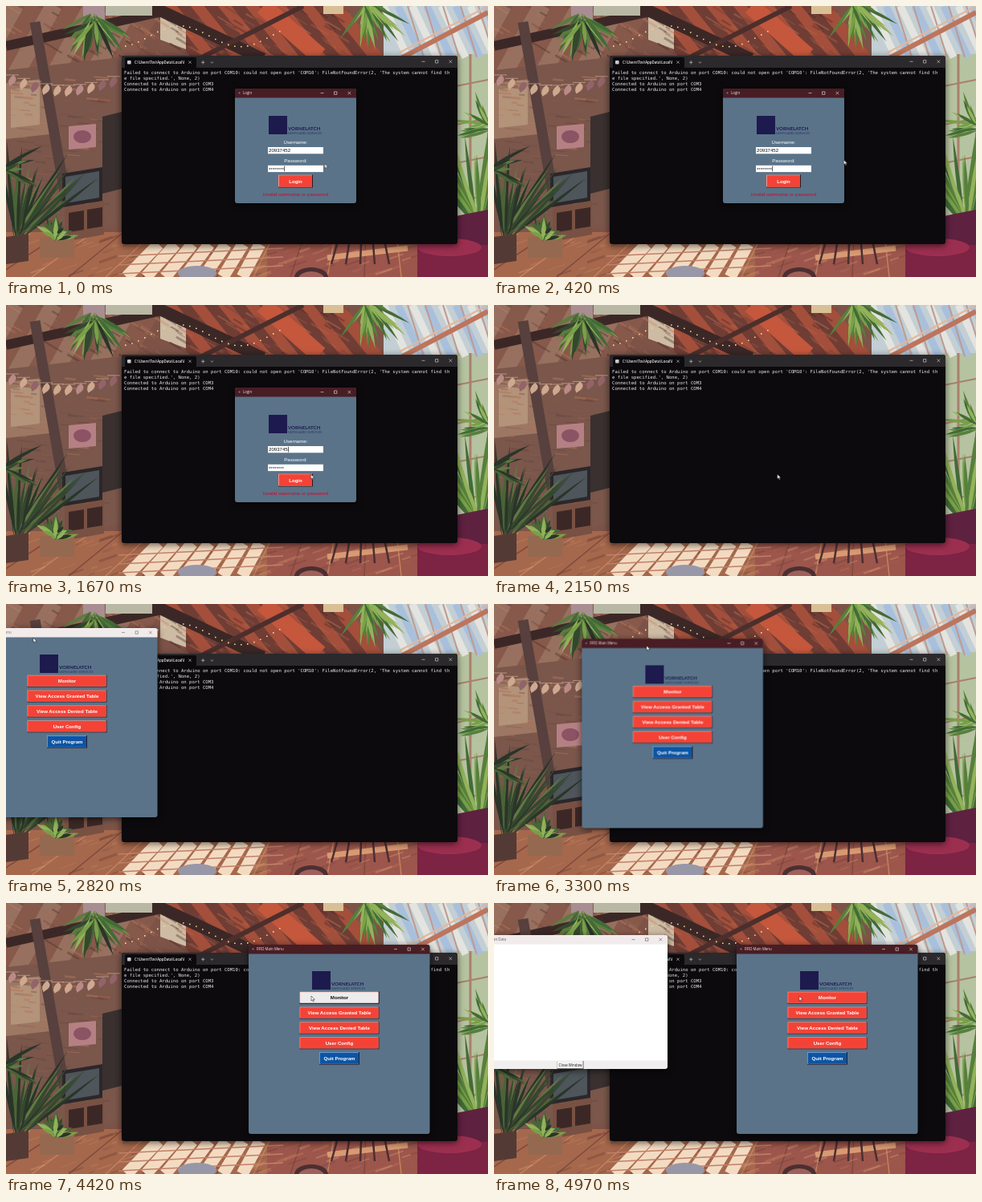
Recreate the animation shown at these times as an HTML page with a canvas. Size 600 by 338 pixels, loop 5 s.

```html
<!DOCTYPE html>
<html lang="en">
<head>
<meta charset="utf-8">
<title>Login demo</title>
<style>
html, body { margin: 0; width: 100%; height: 100%; overflow: hidden; background: #7d5348; }
canvas, svg { position: absolute; left: 0; top: 0; width: 600px; height: 338px; }
text { font: 6.1px "Liberation Sans", Arial, sans-serif; }
.mono { font: 5.62px "DejaVu Sans Mono", monospace; fill: #ececec; }
.ui { font: 4.4px "Open Sans", sans-serif; }
.tab { font-weight: 600; fill: #f2f2f2; }
.bold { font-weight: 700; }
.brand { font: 700 6.1px Lato, sans-serif; fill: #1d1a4e; }
.tag { font: 3.5px Lato, sans-serif; fill: #26315c; letter-spacing: .3px; }
.mid { text-anchor: middle; }
.win { filter: drop-shadow(0 2px 4px #0009); }
.icons { fill: none; stroke-width: .6; }
</style>
</head>
<body>
<canvas id="room" width="600" height="338"></canvas>
<svg id="stage" viewBox="0 0 600 338"></svg>
<script>
// Painted room
const g = document.getElementById('room').getContext('2d');
let seed = 11;
const rnd = (a, b) => {
  seed = (seed * 16807) % 2147483647;
  return a + (b - a) * seed / 2147483647;
};
const pick = list => list[Math.floor(rnd(0, list.length))];
const repeat = (n, draw) => { for (let i = 0; i < n; i++) draw(i); };

function beam(color, w, x1, y1, x2, y2) {
  g.strokeStyle = color;
  g.lineWidth = w;
  g.beginPath();
  g.moveTo(x1, y1);
  g.lineTo(x2, y2);
  g.stroke();
}
function block(color, x, y, w, h, skew = 0) {
  g.fillStyle = color;
  g.beginPath();
  g.moveTo(x, y);
  g.lineTo(x + w, y + skew);
  g.lineTo(x + w, y + h + skew);
  g.lineTo(x, y + h);
  g.fill();
}
function oval(color, x, y, rx, ry) {
  g.fillStyle = color;
  g.beginPath();
  g.ellipse(x, y, rx, ry, 0, 0, 7);
  g.fill();
}
function leaf(x, y, angle, len, w, color) {
  g.save();
  g.translate(x, y);
  g.rotate(angle);
  g.fillStyle = color;
  g.beginPath();
  g.quadraticCurveTo(len * .45, -w, len, w / 2);
  g.moveTo(0, 0);
  g.quadraticCurveTo(len * .45, -w, len, w / 2);
  g.quadraticCurveTo(len * .45, w, 0, 0);
  g.fill();
  g.restore();
}
const fan = (x, y, n, aim, spread, len, w, colors) => repeat(n, () =>
  leaf(x + rnd(-5, 5), y + rnd(-5, 5), aim + rnd(-spread, spread), rnd(len * .4, len), w, pick(colors)));

function brush(n, x, y, w, h, slope, colors) {
  g.globalAlpha = .35;
  repeat(n, () => {
    const a = rnd(x, x + w), b = rnd(y, y + h), l = rnd(6, 24);
    beam(pick(colors), rnd(.6, 3), a, b, a + l, b + l * slope);
  });
  g.globalAlpha = 1;
}

const fresh = ['#56803c', '#79a048', '#426b38', '#93b25a'];
const shade = ['#35482f', '#4b6437', '#2a3529', '#5f7a42'];
const warm = ['#c98462', '#6b3d36', '#b8664a', '#8d5a4c'];
const dark = '#3b2826';

function paintCeiling() {
  repeat(9, i => beam(i % 2 ? '#97705f' : '#86594b', 26, i * 24 - 10, 0, i * 24 - 60, 90));
  repeat(14, i => beam(i % 2 ? '#a34f3b' : '#703d35', 16, 185 + i * 17, -5, 245 + i * 17, 70));
  block('#cdbba4', 192, 12, 32, 30, 12);
  brush(130, 0, 0, 430, 62, .6, [...warm, dark]);
  beam(dark, 12, 0, 50, 190, 8);
  beam(dark, 15, 180, 0, 320, 66);
  beam('#c4573c', 22, 320, 0, 390, 62);
  beam('#4c2f2c', 6, 240, 66, 370, 0);
  block('#b8b8a4', 124, 0, 58, 12);
  block('#d9bf95', 395, 0, 25, 10);
  repeat(26, i => block('#f3d894', 140 + i * 8, 50 - 26 * Math.sin(i / 6) ** 2, 1.6, 1.6));
}

function paintWall() {
  block('#7a564b', 0, 80, 144, 210, -16);
  block('#9c7763', 0, 96, 54, 70, -6);
  block('#b3937a', 6, 104, 36, 48, -4);
  brush(110, 0, 80, 125, 190, .1, [...warm, '#5b4340']);
  beam('#57403d', 13, 36, 20, 76, 250);
  block('#39302f', 120, 138, 24, 96, -6);
  block('#b58084', 78, 150, 34, 29, -3);
  oval('#8b5363', 95, 163, 11, 8);
  repeat(10, i => {
    const x = 4 + i * 14, y = 86 + 13 * Math.sin(i / 3);
    leaf(x + 5, y, Math.PI / 2, 14, 9, pick(['#b98a86', '#cfa890', '#93636a']));
    beam('#d1b097', .7, x - 4, y, x + 12, y);
  });
}

function paintWindows() {
  block('#c3cfd4', 470, 0, 130, 64);
  block('#b6c3a0', 556, 60, 44, 225);
  repeat(9, i => beam(i % 2 ? '#a9c0dc' : '#e3e4df', 9, 470 + i * 18, 0, 500 + i * 18, 64));
  repeat(6, i => beam('#c09a90', 2, 500 + i * 22, 0, 520 + i * 22, 64));
  beam('#bd755c', 6, 490, 66, 600, 8);
  beam('#e2b79d', 2, 490, 58, 600, 0);
  repeat(4, i => beam('#a9806c', 2, 560, 100 + i * 48, 600, 92 + i * 48));
  beam('#a9806c', 3, 578, 60, 578, 270);
  fan(450, -4, 34, 1.3, .9, 62, 4, fresh);
  fan(590, 275, 26, -1.8, .5, 185, 5, fresh);
  fan(600, 150, 14, -2.8, .9, 50, 4, fresh);
}

function paintFloor() {
  block('#a5684c', 0, 282, 600, 60);
  block('#9c564c', 325, 296, 190, 42);
  repeat(16, i => beam(i % 2 ? '#80493f' : '#c4835e', 1.5, i * 46 - 60, 338, i * 38 + 30, 284));
  brush(150, 0, 290, 520, 48, -.35, [...warm, '#dda078']);
  repeat(7, i => beam('#f3dbc2', 15, 150 + i * 24, 338, 190 + i * 21, 297));
  repeat(3, i => beam('#c08068', 1.3, 140, 312 + i * 11, 345, 302 + i * 11));
  beam('#d89a72', 7, 400, 314, 500, 302);
  repeat(5, i => beam('#4b2f32', 2.5, 412 + i * 15, 297, 405 + i * 18, 322));
  oval('#4b2f32', 380, 338, 21, 12);
  oval('#a0605a', 380, 340, 16, 9);
  oval('#9797a8', 238, 333, 24, 9);
}

function paintFurniture() {
  block('#785143', 73, 252, 49, 42, -9);
  repeat(2, i => block(dark, 78 + i * 23, 258 - i * 4, 19, 24, -3));
  block('#2b272a', 70, 209, 50, 42, -8);
  block('#4e555b', 74, 213, 42, 33, -7);
  fan(14, 290, 30, -1.3, .7, 128, 4, shade);
  fan(-4, 205, 12, -.3, .9, 55, 4, shade);
  block('#543a35', 0, 288, 28, 34, -4);
  block('#94694f', 42, 288, 43, 26);
  fan(62, 288, 28, -1.6, 1.5, 26, 5, [...fresh, ...shade]);
  block('#5f2140', 560, 262, 40, 76, -8);
  block('#7d2344', 512, 298, 88, 40);
  oval('#9c2f50', 552, 301, 40, 11);
  block('#a88d92', 96, 0, 27, 18);
  fan(108, 14, 34, 1.6, 1.2, 62, 5, [...fresh, ...shade]);
}
[paintCeiling, paintWall, paintWindows, paintFloor, paintFurniture].forEach(paint => paint());

// Windows
const rect = (x, y, w, h, color, more = '') => `<rect x="${x}" y="${y}" width="${w}" height="${h}" fill="${color}" ${more}/>`;
const text = (x, y, s, cls = '', color = '', more = '') =>
  `<text x="${x}" y="${y}" class="${cls}" ${color && `fill="${color}"`} ${more}>${s}</text>`;
const group = (id, body, cls = '') => `<g id="${id}" class="${cls}">${body}</g>`;
const at = (x, y, body) => `<g transform="translate(${x} ${y})">${body}</g>`;
const controls = (right, y, ink) => `<path class="icons" stroke="${ink}" d="M${right - 44.5} ${y}h4
  M${right - 27.5} ${y - 1.7}h3.4v3.4h-3.4z M${right - 10.4} ${y - 1.8}l3.6 3.6m0-3.6l-3.6 3.6"/>`;
const bar = (w, h, color) => `<path d="M0 ${h}V3Q0 0 3 0H${w - 3}Q${w} 0 ${w} 3V${h}Z" fill="${color}"/>`;
const caption = (w, title, back, ink) => bar(w, 11.5, back) +
  '<circle cx="5.5" cy="5.5" r="1.1" fill="#5a86b8"/>' + text(10, 7.3, title, 'ui', ink) + controls(w, 5.6, ink);
const button = (x, y, w, h, label, color, ink = '#fff', lit = '#ffb3a8') =>
  rect(x, y, w, h, '#2a1c26') + rect(x, y, w - 1, h - 1, lit) + rect(x + .7, y + .7, w - 1.7, h - 1.7, color) +
  text(x + w / 2, y + h / 2 + 2, label, 'bold mid', ink);
const brand = (x, y) => rect(x, y, 23, 23, '#1d1a4e') +
  text(x + 24, y + 18, 'VORNELATCH', 'brand') + text(x + 24, y + 23, 'SAFEGUARD SERVICES', 'tag');
const entry = (y, label) => text(75.5, y - 4.2, label, 'mid', '#fff') + rect(41, y, 69, 8.3, '#fff');
const caret = (id, x, y) => rect(x, y, .7, 6.6, '#111', `id="${id}"`);

const RED = '#f44336', SLATE = '#5a7389', WINE = '#481d24', PALE = '#f2ebeb', PRESSED = '#ececec', INK = '#111';

const log = [
  "Failed to connect to Arduino on port COM10: could not open port 'COM10': FileNotFoundError(2, 'The system cannot find th",
  "e file specified.', None, 2)",
  'Connected to Arduino on port COM3',
  'Connected to Arduino on port COM4'
];
const terminal = at(144, 62, rect(0, 0, 418, 235, '#0c0a0d', 'rx="3"') + bar(418, 15, '#2b292c') +
  rect(4, 2, 89, 13.5, '#0c0a0d', 'rx="2"') + rect(7, 6, 4.6, 4.6, '#c9c9cc', 'rx=".8"') +
  text(16, 9.9, 'C:\\Users\\Tov\\AppData\\Local\\I', 'ui tab') +
  '<path class="icons" stroke="#ddd" d="M83.4 6.6l3.2 3.2m0-3.2l-3.2 3.2M99 8.3h4.4m-2.2-2.2v4.4M110.8 7.6l1.6 1.5 1.6-1.5"/>' +
  controls(418, 7.3, '#ddd') +
  log.map((s, i) => text(3, 23.1 + i * 7, s, 'mono')).join(''));

const login = at(285, 103,
  rect(0, 0, 151, 143, SLATE, 'rx="3"') + caption(151, 'Login', WINE, '#f4e8e8') + brand(42, 34) +
  entry(73, 'Username:') + text(42, 79.3, '20937452', '', INK, 'id="full"') + text(42, 79.3, '2093745', '', INK, 'id="cut"') +
  entry(95.8, 'Password:') + text(42, 103, '********', '', INK) +
  caret('passCaret', 61, 96.6) + caret('cutCaret', 66, 73.9) + caret('fullCaret', 69.4, 73.9) +
  button(54, 107.5, 43, 16, 'Login', RED) + group('loginDown', button(54, 107.5, 43, 16, 'Login', PRESSED, INK)) +
  text(75.5, 134, 'Invalid username or password', 'mid', '#d3062a'));

const menu = rect(0, 0, 225.5, 236, SLATE, 'rx="3"') +
  group('idle', caption(225.5, 'RFID Main Menu', PALE, '#6f6868')) +
  group('active', caption(225.5, 'RFID Main Menu', WINE, '#f4e8e8')) + brand(79, 33) +
  ['Monitor', 'View Access Granted Table', 'View Access Denied Table', 'User Config']
    .map((s, i) => button(63.5, 58.6 + i * 18.9, 99, 15, s, RED)).join('') +
  group('monitorDown', button(63.5, 58.6, 99, 15, 'Monitor', PRESSED, INK)) +
  button(88, 134, 50, 15.6, 'Quit Program', '#0d55a4', '#fff', '#86b2e0');

const scan = at(-26, 40,
  rect(0, 0, 242, 167, '#f0eeee', 'rx="3"') + caption(242, 'RFID Scan Data', PALE, '#5f5858') +
  rect(0, 11.5, 242, 145, '#fff') + rect(104.5, 157, 33, 10, '#555') + rect(104.5, 157, 32.2, 9.2, '#f3f1f1') +
  text(121, 163.6, 'Close Window', 'ui mid', INK));

document.getElementById('stage').innerHTML =
  group('terminal', terminal, 'win') + group('login', login, 'win') + group('menu', menu, 'win') +
  group('scan', scan, 'win') +
  group('pointer', '<path d="M0 0V6L1.4 4.8 2.4 7 3.4 6.5 2.4 4.4H4.3Z" fill="#fff" stroke="#111" stroke-width=".5"/>');

// Motion, times in ms
const LOOP = 5000;
const play = (id, frames) =>
  document.getElementById(id).animate(frames, { duration: LOOP, iterations: Infinity });

// Visible at first or not, then toggled at each given time
function toggle(id, on, ...times) {
  const frames = [0, ...times, LOOP].map((t, i) => ({
    offset: t / LOOP,
    opacity: Number(on === (i % 2 === 0)),
    easing: 'step-end'
  }));
  play(id, frames);
}
const move = (id, stops) => play(id, stops.map(([t, x, y]) =>
  ({ offset: t / LOOP, transform: `translate(${x}px, ${y}px)`, easing: 'ease-in-out' })));

const CLICK = 2050, OPEN = 2300, GRAB = 2950, PRESS = 4380;
const drag = [[GRAB, -37, 30], [3670, 269, 58], [3950, 302, 52]];
const held = drag.map(([t, x, y]) => [t, x + 80.5, y + 8.5]);

move('menu', [[0, -37, 30], ...drag, [LOOP, 302, 52]]);
move('pointer', [
  [0, 396.5, 196.5], [880, 480.5, 186.5], [1250, 384, 179], [1670, 379.5, 211], [CLICK, 364, 217],
  [2820, 34, 42], ...held, [4300, 380, 116], [LOOP, 380, 116]
]);
toggle('passCaret', true, 600, 900, 1200);
toggle('full', true, 1600, 1800);
toggle('cut', false, 1600, 1800);
toggle('cutCaret', false, 1600, 1800);
toggle('fullCaret', false, 1200, 1600, 1800);
toggle('loginDown', false, CLICK);
toggle('login', true, CLICK + 100);
toggle('menu', false, OPEN);
toggle('idle', true, GRAB);
toggle('active', false, GRAB);
toggle('monitorDown', false, PRESS, PRESS + 180);
toggle('scan', false, PRESS + 270);
</script>
</body>
</html>
```
